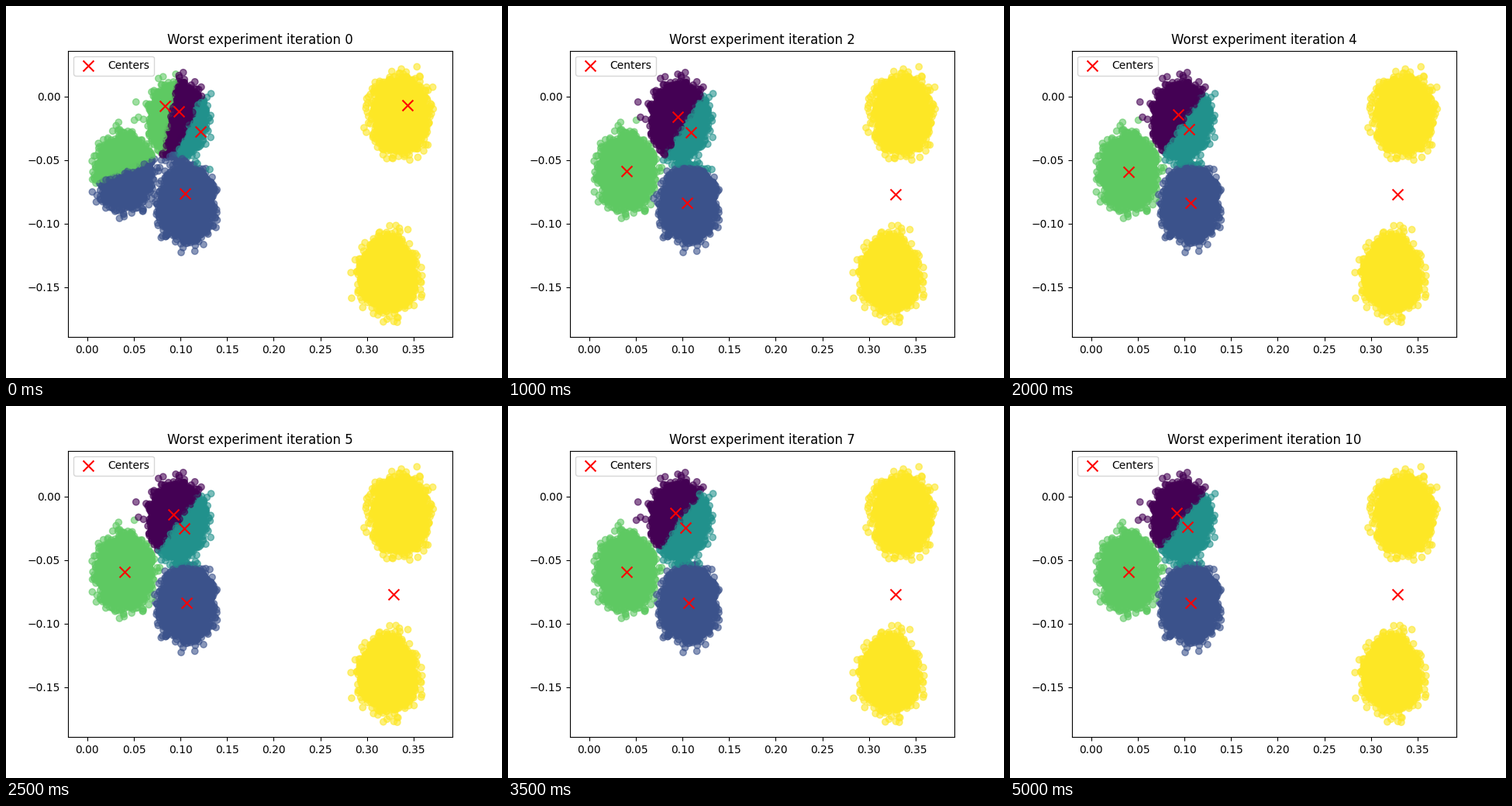
A matplotlib script that plays this animation: 640x480 px, repeating every 5500 ms.

```python
import numpy as np
import matplotlib.pyplot as plt
from matplotlib.animation import FuncAnimation

FRAMES, INTERVAL = 11, 500
N, SIGMA = 10000, 0.01
rng = np.random.default_rng(7)

MEANS = np.array([(0.0400, -0.0593), (0.0972, -0.0183), (0.1065, -0.0836),
                  (0.3356, -0.0145), (0.3223, -0.1390)])
START = np.array([(0.0982, -0.0117), (0.1051, -0.0764), (0.1217, -0.0276),
                  (0.0835, -0.0075), (0.3438, -0.0069)])

noise = rng.normal(size=(len(MEANS), N, 2))
noise -= noise.mean(axis=1, keepdims=True)
points = (MEANS[:, None] + SIGMA * noise).reshape(-1, 2)

# The middle of each cluster is solid, so a quarter of its points is enough to draw
radius = np.hypot(noise[..., 0], noise[..., 1]).ravel()
shown = (radius > 2) | (np.arange(radius.size) % 4 == 0)


def nearest(centers):
    return ((points[:, None] - centers) ** 2).sum(axis=2).argmin(axis=1)


def kmeans(centers, steps):
    """Centers and visible labels of every Lloyd iteration."""
    history = []
    for _ in range(steps):
        labels = nearest(centers)
        history.append((centers, labels[shown]))
        centers = np.array([points[labels == k].mean(axis=0)
                            for k in range(len(centers))])
    return history


history = kmeans(START, FRAMES)

fig, ax = plt.subplots(figsize=(6.4, 4.8), dpi=100)
cloud = ax.scatter(*points[shown].T, c=history[0][1], cmap="viridis",
                   vmin=0, vmax=4, alpha=0.6)
marks = ax.scatter(*START.T, c="red", marker="x", s=100, label="Centers")
ax.set(xlim=(-0.02071, 0.39177), ylim=(-0.1893, 0.03607))
ax.legend(loc="upper left")


def update(i):
    centers, labels = history[i]
    cloud.set_array(labels)
    marks.set_offsets(centers)
    ax.set_title(f"Worst experiment iteration {i}")
    return cloud, marks


anim = FuncAnimation(fig, update, frames=FRAMES, interval=INTERVAL,
                     repeat=True, repeat_delay=0)
plt.show()
```
